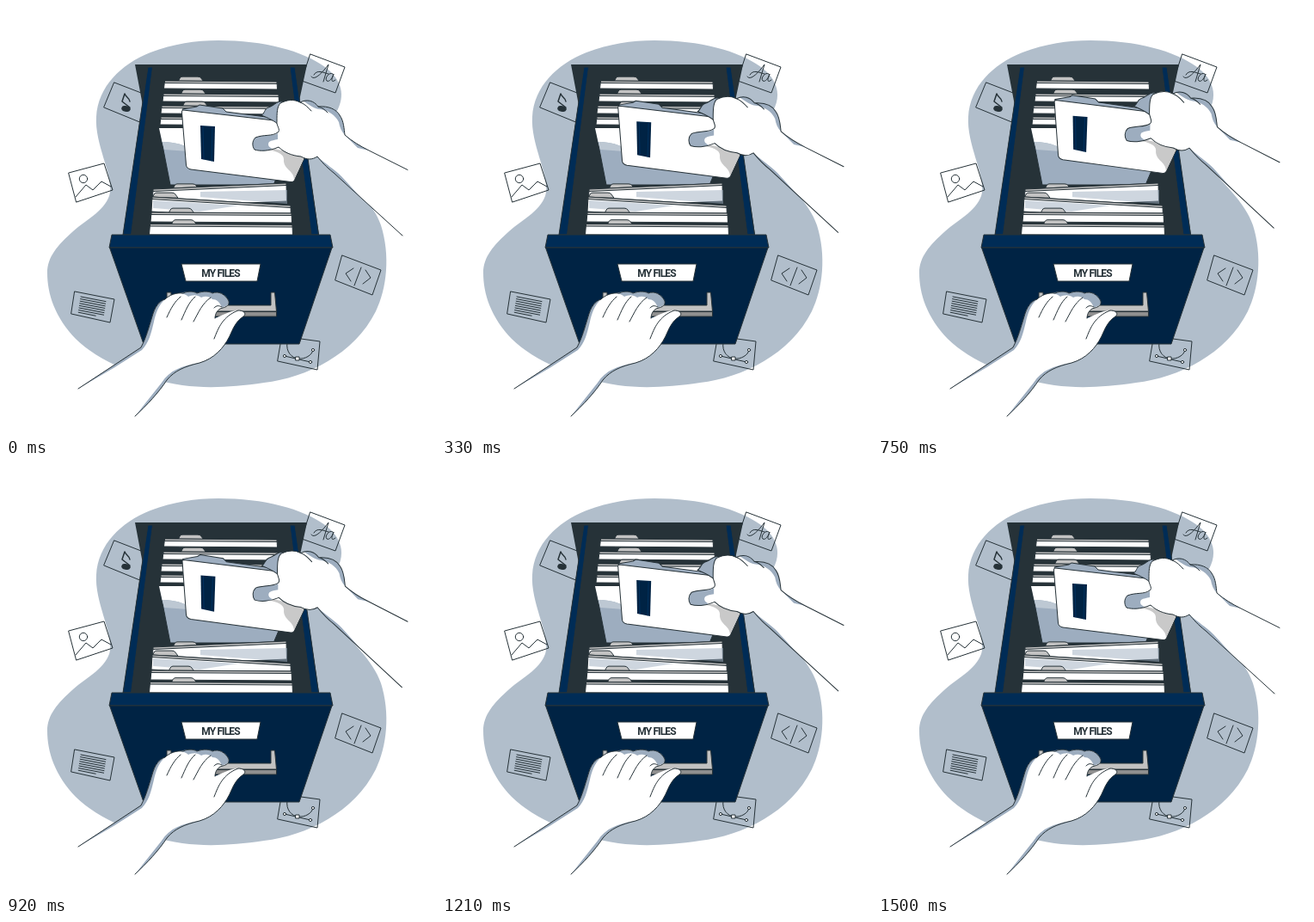
Write an HTML page that moves like this. It is 500 px wide and 500 px high and loops after 1540 ms.

```html
<!DOCTYPE html>
<html lang="en">
<head>
<meta charset="utf-8">
<title>My files</title>
<style>
html,body{margin:0;width:100%;height:100%;overflow:hidden;background:#fff}
svg{display:block;width:100vw;height:100vh}
.l{fill:none;stroke:#263238;stroke-width:1;stroke-linecap:round;stroke-linejoin:round}
.o{stroke:#263238;stroke-width:1;stroke-linejoin:round}
.w{fill:#fff}
.k{fill:#263238}
.g{fill:#c2c2c2}
.s{fill:#9dadbf}
.n{fill:#002344}
.b{fill:#002c56}
.t{font:700 12px Roboto,"Liberation Sans",sans-serif;letter-spacing:-.9px;text-anchor:middle;fill:#263238}
</style>
</head>
<body>
<svg viewBox="0 0 500 500">
  <path fill="#b1becb" d="M247,40C300,40 345,52 371,71C392,87 394,105 385,122C372,150 366,165 380,182C400,205 427,228 436,255C447,290 443,328 430,355C405,405 350,432 300,438C265,443 235,445 205,441C158,434 107,413 81,387C57,362 48,335 48,310C48,292 60,278 78,262C95,247 117,237 121,217C124,195 103,160 105,129C107,94 133,68 168,54C195,44 220,40 247,40Z"/>

  <g class="l">
    <path d="M354,56L394,71L383,101L344,87Z"/>
    <path d="M355,82C358,87 366,80 375,68L369,88M358,80C362,73 370,78 375,79M380,79C376,76 370,84 373,87C376,89 380,83 381,79C378,86 378,90 383,86"/>
    <path d="M126,89L170,106L158,136L114,118Z"/>
    <path d="M144,118L135,111L138,102C139,106 144,107 144,111" stroke-width="1.500"/>
    <ellipse class="k" cx="139.500" cy="119.500" rx="4.800" ry="2.800" transform="rotate(12 139.500 119.500)"/>
    <path d="M73,194L114,183L124,214L82,228Z"/>
    <circle cx="90" cy="201" r="4.700"/>
    <path d="M81,222L93,208L101,214L111,204L122,210"/>
    <path d="M80,332L126,341L121,368L76,358Z"/>
    <path id="lines"/>
    <path d="M391,290L436,307L426,336L383,319Z"/>
    <path d="M404,305L395,311L401,320M413,304L405,325M418,307L424,316L415,323"/>
    <path d="M321,384L365,390L362,423L316,413Z"/>
    <path d="M327,391C325,403 333,409 339,410C348,411 356,406 357,400M324,407L354,414"/>
    <g class="w o"><circle cx="324" cy="407" r="1.600"/><circle cx="354" cy="414" r="1.600"/><circle cx="357" cy="400" r="1.600"/><path d="M337,408h4v4h-4Z"/></g>
  </g>

  <path class="k" d="M150,68H350L341,110L364,266H136L158.500,113Z"/>
  <path class="b o" d="M165,71H170.500L145.500,266H136ZM330,71H336L363.500,266H355Z"/>
  <g id="back"></g>
  <path class="s o" d="M178,141.500H319L323,180L311,208H191Z"/>
  <path class="w" d="M178,142H212V165C203,160 193,158 181.500,158Z"/>
  <path fill="#bdc8d3" d="M181.500,158C193,158 203,160 212,165V169L184,167Z"/>
  <g id="front"></g>

  <path class="b o" d="M123,266H377L380,281H120Z"/>
  <path class="n o" d="M120.500,281H379L341,393H160Z"/>
  <path class="w o" d="M204,300H296L292,320H209Z"/>
  <text class="t" x="249.500" y="314.500">MY FILES</text>

  <path class="g o" d="M187,333H192V348H308V333H312.500L314.500,355H187Z"/>
  <path class="o" fill="#8f8f8f" d="M242,355.500H314.500V361H242Z"/>

  <path class="w" d="M84,445L157,397C163,386 166,374 170,361C173,350 178,343 185,341C190,336 198,333 206,334C212,331 219,332 222,334C230,331 237,332 240,334C247,331 255,335 259,343C260,348 256,350 252,351C246,352 243,358 243,363C252,360 260,354 270,354C277,354 280,358 276,361C267,367 264,375 260,384C253,398 242,410 225,415C208,419 196,424 187,435C178,449 164,464 150,477Z"/>
  <path class="s" d="M203,334C212,331 219,332 222,334C230,331 237,332 240,334C247,331 255,335 259,343C259,348 255,350 251,350C248,344 245,341 240,341C236,337 231,337 227,339C222,335 216,336 212,338C209,335 206,335 203,334Z"/>
  <path class="s" d="M225,415C208,419 196,424 187,435C178,449 164,464 150,477L181,438C190,424 204,418 225,415Z"/>
  <path class="s" d="M84,445L157,397C163,386 166,374 170,361C173,350 178,343 185,341C177,348 174,358 172,367C169,380 166,392 158,400L125,421Z"/>
  <path class="l" d="M84,445L157,397C163,386 166,374 170,361C173,350 178,343 185,341C190,336 198,333 206,334C212,331 219,332 222,334C230,331 237,332 240,334C247,331 255,335 259,343C260,348 256,350 252,351C246,352 243,358 243,363M242,387C247,374 252,361 270,354C277,354 280,358 276,361C267,367 264,375 260,384C253,398 242,410 225,415C208,419 196,424 187,435C178,449 164,464 150,477M203,338C196,344 192,351 187,362M220,338C212,345 209,354 204,365M238,339C228,346 224,356 218,367M251,350C247,348 245,348 242,351"/>

  <g id="hand">
    <path class="s o" d="M205,120L222,117L225,115L252,119L256,123L318,131V150H215Z"/>
    <path class="w o" d="M206,121L320,134L347,177L336,201Q335,205 331,204.500L215,190Q210,189 209.500,185L204.500,124Q204,121 206,121Z"/>
    <path fill="#c9c9c9" d="M304,164L345,174L346,178L335,202C335,191 322,190 323,178C323,172 315,169 304,167Z"/>
    <path class="n" d="M226,139L243,140L242,181L227,178Z"/>
    <path class="l" style="stroke:#003a70;stroke-width:.6" d="M229,140L230,178M240,141L239,180"/>
    <path class="s o" d="M297,127C301,125 300,120 305,118C312,116 314,111 320,111L330,113L318,139C312,133 304,130 297,127Z"/>
    <path class="w" d="M319,113C327,109 334,108 342,112C350,108 358,110 363,117C375,116 384,120 388,127C393,134 393,143 394,150C402,157 412,163 422,168L467,190.500L461,267L381,194C372,187 367,181 362,175C356,179 350,179 343,175C332,174 323,170 317,164C306,169 295,169 289,167C286,163 286,157 290,153C300,149 309,152 316,147C320,144 314,139 315,134C315,125 315,117 319,113Z"/>
    <path class="s" d="M316,148C309,152 300,149 290,153C286,157 286,163 289,167C295,169 304,169 310,166C305,164 304,161 306,158C309,156 312,156 316,155Z"/>
    <path class="s" d="M345,110C352,108 359,111 363,117C375,116 384,120 388,127C393,134 393,143 394,150C390,146 388,141 387,135C383,127 375,121 364,120C357,119 350,113 345,110Z"/>
    <path class="s" d="M362,175C367,181 372,187 381,194L412,222L390,198C382,190 372,184 362,175ZM394,150C402,157 412,163 422,168L409,165Z"/>
    <path class="l" d="M467,190.500L422,168C412,163 402,157 394,150C393,143 393,134 388,127C384,120 375,116 363,117C358,110 350,108 342,112C334,108 327,109 319,113C315,117 315,125 315,134C314,139 320,144 316,147C309,152 300,149 290,153C286,157 286,163 289,167C295,169 306,169 317,164C323,170 332,174 343,175C350,179 356,179 362,175C367,181 372,187 381,194L461,267M342,112C348,114 351,118 355,122M363,117C368,118 371,121 374,124"/>
  </g>
</svg>
<script>
const $ = id => document.getElementById(id);

// One folder edge: grey rim, white face and a tab starting at tx.
function folder(xl, yl, xr, yr, h, tx) {
  const ty = yl + (yr - yl) * (tx - xl) / (xr - xl);
  return `<path class="g o" d="M${tx - 2},${ty + 1}l2,-4q1,-2 3,-2h18q3,0 4,2l3,4Z"/>` +
    `<path class="w o" d="M${xl},${yl}L${xr},${yr}l.5,${h}L${xl - 1},${yl + h}Z"/>` +
    `<path class="g o" d="M${xl},${yl}L${xr},${yr}v2.500L${xl},${yl + 2.5}Z"/>`;
}

$("back").innerHTML = [
  [184.5, 87, 315, 88, 9, 202], [183, 102, 317, 103, 9, 205],
  [181, 116, 318, 117, 9, 207], [180, 129, 319, 130, 9, 206]
].map(f => folder(...f)).join("");

$("front").innerHTML =
  folder(171, 213, 326, 206, 21, 196) +
  '<path class="s" d="M226,216L327,214V230L226,222Z" opacity=".5"/>' +
  folder(170, 222, 331, 232, 17, 172) +
  '<path class="s" d="M171,226L270,232L225,239L171,235Z" opacity=".5"/>' +
  folder(169, 240, 332, 241, 11, 191) +
  folder(167.5, 253.5, 333, 254.5, 12.5, 194);

let rows = "";
for (let i = 0; i < 8; i++) rows += `M${87 - i * .4},${338 + i * 2.6}l${i < 7 ? 29 : 20},${i < 7 ? 5.6 : 4}`;
$("lines").setAttribute("d", rows);

const LOOP = 1540, STEPS = 36;

function draw(ms) {
  const step = Math.min(STEPS, Math.floor((ms % LOOP + 4) * .024));
  const p = step / STEPS;
  const wave = (1 - Math.cos(2 * Math.PI * p)) / 2;
  const ramp = 1 - Math.abs(2 * p - 1);
  const lift = wave * .6 + ramp * .4;
  $("hand").setAttribute("transform", `translate(0 ${-8.7 * lift}) rotate(${.6 * lift} 467 190)`);
}

const start = performance.now();
function tick() {
  draw(performance.now() - start);
  requestAnimationFrame(tick);
}
tick();
</script>
</body>
</html>
```
